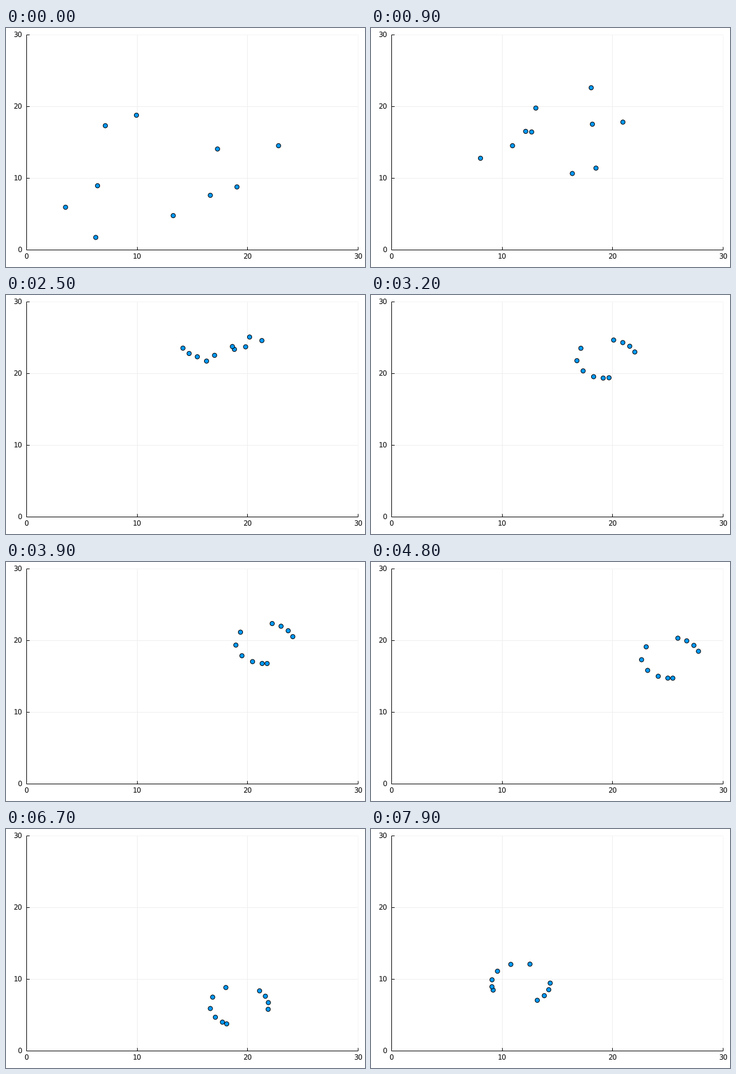
A matplotlib script for the animation above (8 s loop, 600 by 400 pixels).

```python
import numpy as np
import matplotlib.pyplot as plt
from matplotlib.animation import FuncAnimation

W, H, FRAMES, STEP = 600, 400, 80, 100
PX = 0.72  # points per pixel at 100 dpi
LEFT, RIGHT, TOP, BOTTOM = 34, 588, 11, 371
MEET, FORMED, TURN = 9, 34, 48  # flight ends, ring is complete, ring turns

# Where the dots start, and where their straight flights end
START = np.array([
    [353.5, 218, 166, 153, 150, 99.5, 279.5, 386, 341.5, 455.5],
    [202.5, 146, 163.5, 264, 350.5, 300, 314, 266, 280, 197]]).T
GATHER = np.array([
    [368, 275.5, 268.5, 258.5, 236.5, 183, 336.5, 376, 370, 421],
    [100, 134, 174, 173, 197, 218, 243.5, 234.5, 161, 157.5]]).T

# Way of the flock's centre: time, x, y
PATH = np.array([
    (0, *START.mean(axis=0)), (MEET, *GATHER.mean(axis=0)),
    (25, 362, 90.5), (39, 433, 136), (48, 501, 160.5),
    (54, 490.5, 180), (67, 390, 295.5), (79, 250.5, 258.5)])
TIMES, POINTS = PATH[:, 0], PATH[:, 1:]
SLOPES = np.gradient(POINTS, TIMES, axis=0)

# Two arcs of dots: six on the left and below, four on the right and above
ANGLES = np.radians(np.r_[86 + 127 * np.linspace(0, 1, 6) ** 1.6,
                          np.linspace(284, 341, 4)])


def ease(u):
    u = np.clip(u, 0, 1)
    return u * u * (3 - 2 * u)


def centre(t):
    """Cubic Hermite curve along the path."""
    k = min(np.searchsorted(TIMES, t, "right"), len(TIMES) - 1) - 1
    d = TIMES[k + 1] - TIMES[k]
    s = (t - TIMES[k]) / d
    bend = SLOPES[k] * (1 - s) - SLOPES[k + 1] * s
    return (POINTS[k] + (POINTS[k + 1] - POINTS[k]) * ease(s)
            + d * s * (1 - s) * bend)


def ring(t):
    """Offsets on an ellipse that turns faster and faster."""
    turn = np.radians(75) * (max(t - TURN, 0) / (FRAMES - 1 - TURN)) ** 1.9
    a = ANGLES + turn
    return np.column_stack([49 * np.cos(a), 34 * np.sin(a)])


def flock(t):
    loose = START + (GATHER - START) * min(t / MEET, 1)
    loose = loose - loose.mean(axis=0)
    mix = ease((t - MEET) / (FORMED - MEET))
    return centre(t) + loose * (1 - mix) + ring(t) * mix


plt.rcParams.update({"font.family": "DejaVu Sans", "text.hinting": "none"})
fig = plt.figure(figsize=(W / 100, H / 100), dpi=100, facecolor="white")
ax = fig.add_axes([0, 0, 1, 1])
ax.set(xlim=(0, W), ylim=(H, 0))
ax.axis("off")


def line(xs, ys, color="black", z=2):
    ax.plot(xs, ys, color=color, lw=PX, zorder=z, solid_capstyle="butt")


def label(x, y, n, ha):
    ax.text(x, y, str(n), fontsize=11.6 * PX, ha=ha, va="center_baseline")


for n in (0, 10, 20, 30):
    x = LEFT + (RIGHT - LEFT) * n / 30
    y = BOTTOM + (TOP - BOTTOM) * n / 30
    if n:
        shade = "#eeeeee" if n < 30 else "#f4f4f4"
        line([x, x], [TOP, BOTTOM], shade, 1)
        line([LEFT, RIGHT], [y, y], shade, 1)
    line([x, x], [BOTTOM, BOTTOM - 5])
    line([LEFT, LEFT + 5], [y, y])
    label(x, 382.5, n, "center")
    label(27, y + 0.5, n, "right")
line([LEFT, LEFT], [TOP, BOTTOM])
line([LEFT, RIGHT], [BOTTOM, BOTTOM])

# One colour per dot keeps positions finer than whole pixels
dots = ax.scatter(*START.T, s=(7.3 * PX) ** 2, c=["#009af9"] * len(START),
                  edgecolors="black", linewidths=PX, zorder=3)


def draw(i):
    dots.set_offsets(flock(i))
    return (dots,)


anim = FuncAnimation(fig, draw, frames=FRAMES, interval=STEP,
                     repeat=True, repeat_delay=0)
plt.show()
```
